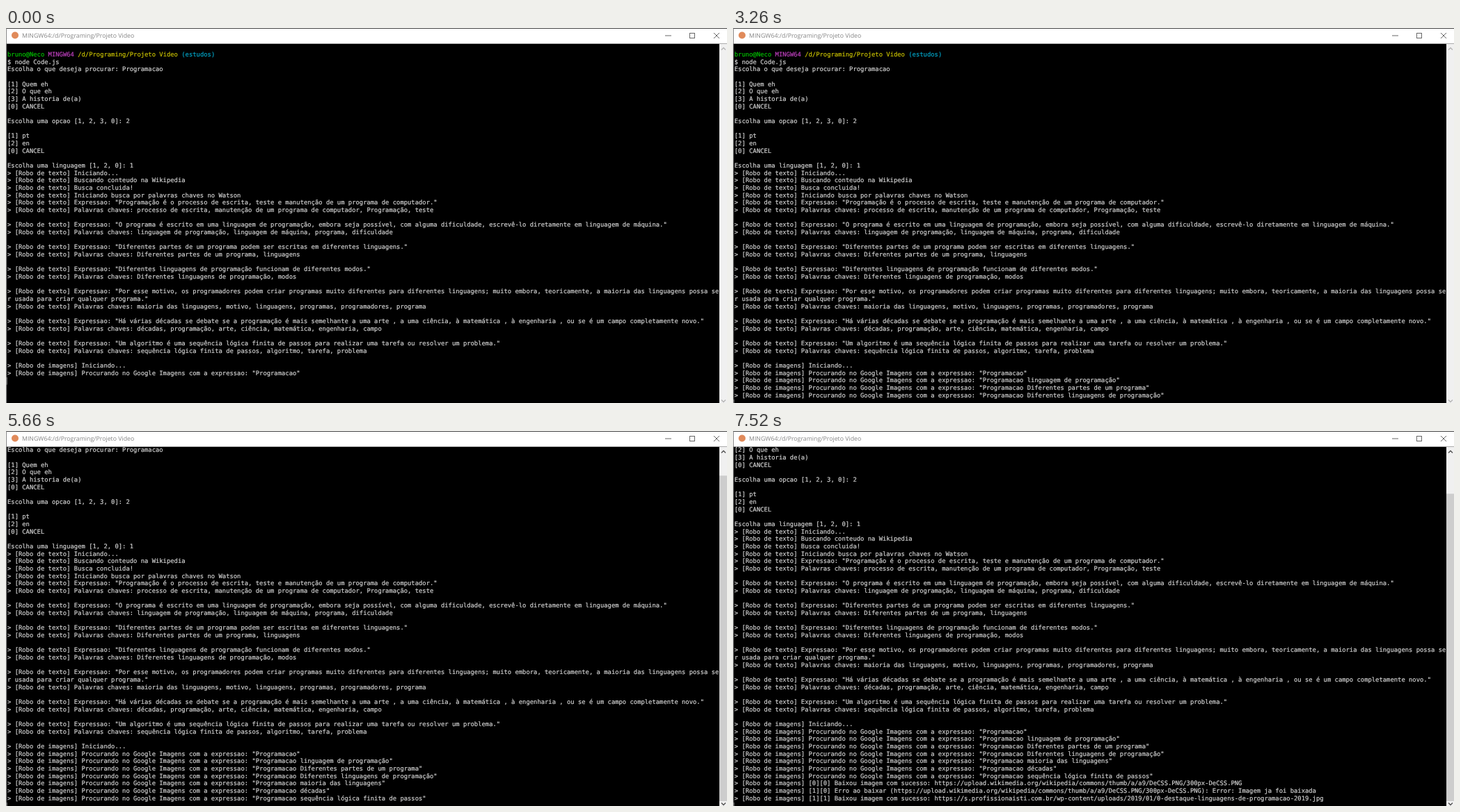
An HTML page with a canvas that plays this animation: 1036x540 px, repeating every 8000 ms.

```html
<!DOCTYPE html>
<html lang="pt">
<head>
<meta charset="utf-8">
<title>Terminal</title>
<style>
html, body { margin: 0; width: 100%; height: 100%; overflow: hidden; background: #000; }
#stage { position: relative; width: 1036px; height: 540px; overflow: hidden; background: #000; }
canvas { position: absolute; left: 0; top: 0; }
#title {
  position: absolute; left: 23px; top: 4px; line-height: 14px; white-space: pre;
  font-family: "Open Sans", sans-serif; font-size: 8.78px; color: #858585;
  text-rendering: geometricPrecision;
}
/* 8 x 16 character cells shown at two thirds */
#term {
  position: absolute; left: 1.67px; top: 23px; margin: 0;
  transform: scale(.666667); transform-origin: 0 0;
  font: 13.289px/16px "DejaVu Sans Mono", monospace; color: #d2d2d2;
  -webkit-text-stroke: .3px; text-rendering: geometricPrecision;
}
.g { color: #00bf00; } .m { color: #bf40bf; } .y { color: #c8c000; } .c { color: #00a5c8; }
</style>
</head>
<body>
<div id="stage">
  <canvas id="frame" width="1036" height="540"></canvas>
  <div id="title">MINGW64:/d/Programing/Projeto Video</div>
  <pre id="term"></pre>
</div>
<script>
const LOOP = 8000, ROWS = 48, ROW_H = 32 / 3, TOP = 23;
const term = document.getElementById('term');
const ctx = document.getElementById('frame').getContext('2d');

const text = s => '> [Robo de texto] ' + s;
const image = s => '> [Robo de imagens] ' + s;
const phrase = (s, keys) => [text('Expressao: "' + s), text('Palavras chaves: ' + keys), ''];
const search = s => image('Procurando no Google Imagens com a expressao: "Programacao' + s + '"');
const thumbUrl = 'https://upload.wikimedia.org/wikipedia/commons/thumb/a/a9/DeCSS.PNG/300px-DeCSS.PNG';

const lines = [
  '',
  '<span class="g">bruno@Neco</span> <span class="m">MINGW64</span> ' +
    '<span class="y">/d/Programing/Projeto Video</span> <span class="c">(estudos)</span>',
  '$ node Code.js',
  'Escolha o que deseja procurar: Programacao',
  '',
  '[1] Quem eh',
  '[2] O que eh',
  '[3] A historia de(a)',
  '[0] CANCEL',
  '',
  'Escolha uma opcao [1, 2, 3, 0]: 2',
  '',
  '[1] pt',
  '[2] en',
  '[0] CANCEL',
  '',
  'Escolha uma linguagem [1, 2, 0]: 1',
  text('Iniciando...'),
  text('Buscando conteudo na Wikipedia'),
  text('Busca concluida!'),
  text('Iniciando busca por palavras chaves no Watson'),
  ...phrase('Programação é o processo de escrita, teste e manutenção de um programa de computador."',
    'processo de escrita, manutenção de um programa de computador, Programação, teste'),
  ...phrase('O programa é escrito em uma linguagem de programação, embora seja possível, com alguma dificuldade, escrevê-lo diretamente em linguagem de máquina."',
    'linguagem de programação, linguagem de máquina, programa, dificuldade'),
  ...phrase('Diferentes partes de um programa podem ser escritas em diferentes linguagens."',
    'Diferentes partes de um programa, linguagens'),
  ...phrase('Diferentes linguagens de programação funcionam de diferentes modos."',
    'Diferentes linguagens de programação, modos'),
  ...phrase('Por esse motivo, os programadores podem criar programas muito diferentes para diferentes linguagens; muito embora, teoricamente, a maioria das linguagens possa se\nr usada para criar qualquer programa."',
    'maioria das linguagens, motivo, linguagens, programas, programadores, programa'),
  ...phrase('Há várias décadas se debate se a programação é mais semelhante a uma arte , a uma ciência, à matemática , à engenharia , ou se é um campo completamente novo."',
    'décadas, programação, arte, ciência, matemática, engenharia, campo'),
  ...phrase('Um algoritmo é uma sequência lógica finita de passos para realizar uma tarefa ou resolver um problema."',
    'sequência lógica finita de passos, algoritmo, tarefa, problema'),
  image('Iniciando...'),
  search(''),
  search(' linguagem de programação'),
  search(' Diferentes partes de um programa'),
  search(' Diferentes linguagens de programação'),
  search(' maioria das linguagens'),
  search(' décadas'),
  search(' sequência lógica finita de passos'),
  image('[0][0] Baixou imagem com sucesso: ' + thumbUrl),
  image('[1][0] Erro ao baixar (' + thumbUrl + '): Error: Imagem ja foi baixada'),
  image('[1][1] Baixou imagem com sucesso: https://s.profissionaisti.com.br/wp-content/uploads/2019/01/0-destaque-linguagens-de-programacao-2019.jpg')
].join('\n').split('\n');

// when each further line is printed
const prints = [1010, 2100, 3260, 4040, 4800, 5660, 7280, 7280, 7450];
const firstCount = lines.length - prints.length;

function rect(color, x, y, w, h) {
  ctx.fillStyle = color;
  ctx.fillRect(x, y, w, h);
}

function stroke(color, width, ...paths) {
  ctx.strokeStyle = color;
  ctx.lineWidth = width;
  ctx.beginPath();
  for (const p of paths) p.forEach(([x, y], i) => i ? ctx.lineTo(x, y) : ctx.moveTo(x, y));
  ctx.stroke();
}

function titleBar() {
  rect('#fff', 0, 0, 1036, 22.67);
  rect('#444', 0, 0, 1036, 1);
  ctx.fillStyle = '#e08a5a';
  ctx.beginPath();
  ctx.arc(13, 10.5, 5, 0, Math.PI * 2);
  ctx.fill();
  stroke('#666', 1, [[947, 11], [956, 11]], [[1017, 7], [1025, 15]], [[1025, 7], [1017, 15]]);
  ctx.strokeRect(982.5, 7.5, 7, 7);
}

function scrollBar(top) {
  const start = 35, end = 533;
  const arrow = top ? '#505050' : '#b5b5b5';
  rect('#f0f0f0', 1025, TOP, 11, 540 - TOP);
  if (top) {
    const y = start + (end - start) * top / (ROWS + top);
    rect('#cdcdcd', 1025, y, 11, end - y);
  }
  stroke(arrow, 1.4, [[1028, 31.5], [1031, 28.5], [1034, 31.5]], [[1028, 535.5], [1031, 538.5], [1034, 535.5]]);
}

function draw(count) {
  const top = Math.max(0, count - ROWS);
  rect('#000', 0, 0, 1036, 540);
  titleBar();
  rect('#888', 0, 0, 1, 540);
  rect('#666', 1, TOP + (count - top) * ROW_H, 1, ROW_H);
  scrollBar(top);
  term.innerHTML = lines.slice(top, count).map(s => s || ' ').join('\n');
}

let shown = -1;
function tick(now) {
  const t = now % LOOP;
  const count = firstCount + prints.filter(p => p <= t).length;
  if (count !== shown) draw(shown = count);
  requestAnimationFrame(tick);
}
tick(performance.now());
</script>
</body>
</html>
```
